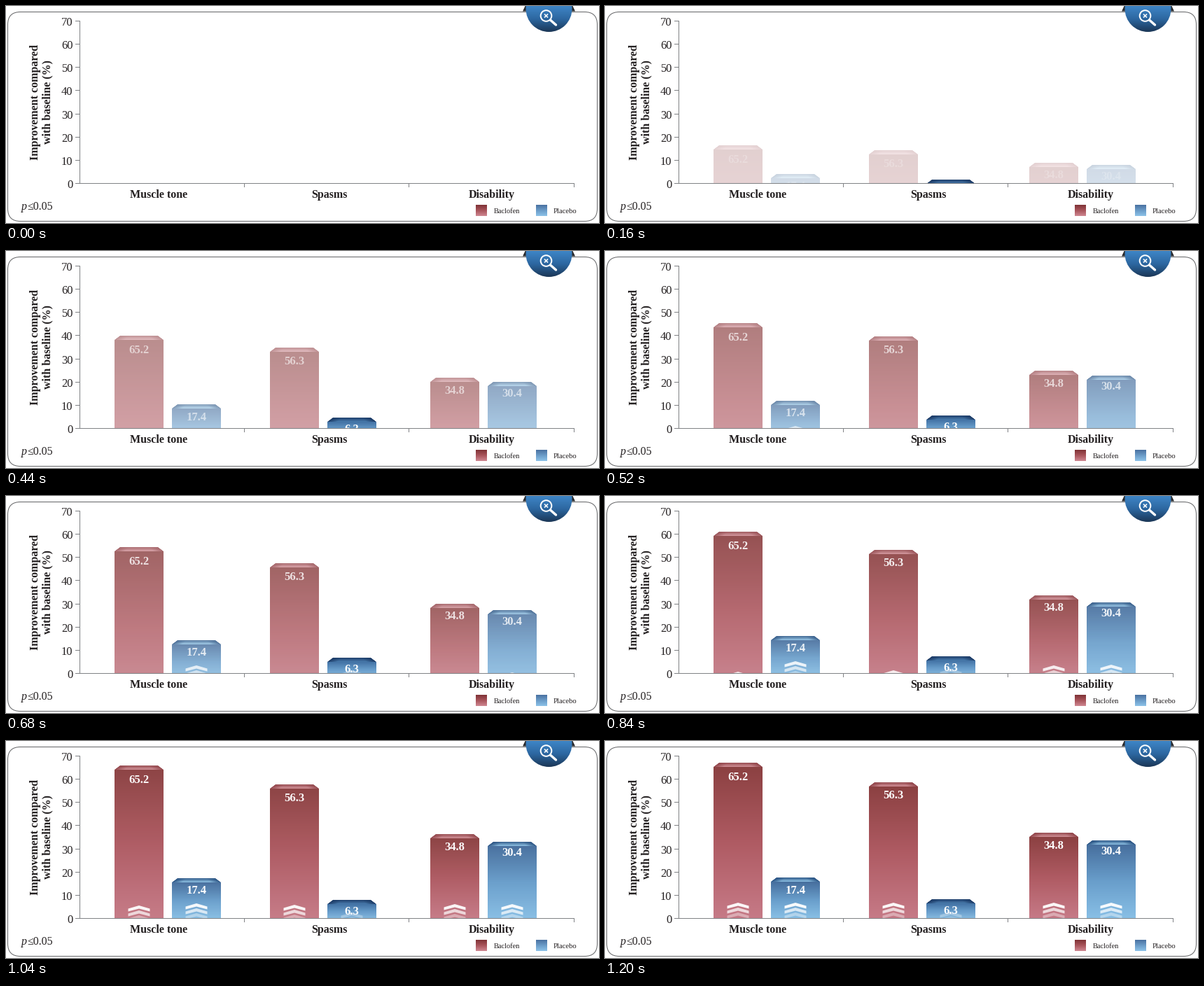
A matplotlib script for the animation above (8 s loop, 847 by 310 pixels).

```python
import numpy as np
import matplotlib.pyplot as plt
from matplotlib.animation import FuncAnimation
from matplotlib.colors import to_rgb
from matplotlib.patches import Circle, FancyBboxPatch, Polygon, Rectangle
from matplotlib.transforms import Affine2D

W, H, DPI = 847, 310, 100
STEP, LOOP, RISE = 40, 8000, 1200  # ms
BASE = 253
SUNK = 2  # extra depth below the baseline at the start
BAR_W, LID_H, LID_INSET = 70, 6, 8
PT = 72 / DPI
INK, AXIS = "#231f20", "#808285"

RED = dict(front=["#8c4142", "#af5b63", "#c67a87"], edge="#94484d", mid="#cc8a91")
BLUE = dict(front=["#476f9e", "#699ecb", "#88bfe5"], edge="#2a5484", mid="#86b9dd")
NAVY = dict(front=["#4474a6", "#669bc9", "#84b8de"], edge="#1d3c68", mid="#4577a8")

# left edge, top of lid, label, label baseline, palette
BARS = [
    (155, 31, "65.2", 55.5, RED),
    (237, 195, "17.4", 217.5, BLUE),
    (377, 59, "56.3", 82.5, RED),
    (459, 226, "6.3", 247, NAVY),
    (606, 131, "34.8", 153.5, RED),
    (688, 142, "30.4", 162.5, BLUE),
]

plt.rcParams["font.family"] = "Liberation Serif"
fig = plt.figure(figsize=(W / DPI, H / DPI), dpi=DPI, facecolor="white")
ax = fig.add_axes([0, 0, 1, 1])
ax.axis("off")


def ramp(colors, n):
    """Vertical colour ramp of n rows."""
    rgb = np.array([to_rgb(c) for c in colors])
    pos = np.linspace(0, 1, n)
    stops = np.linspace(0, 1, len(colors))
    return np.stack([np.interp(pos, stops, rgb[:, k]) for k in range(3)], axis=1)


def gradient(x0, y0, x1, y1, colors, **kw):
    return ax.imshow(ramp(colors, 64)[:, None, :], extent=(x0, x1, y1, y0),
                     aspect="auto", interpolation="bilinear", **kw)


def line(xs, ys, color=AXIS, width=1, cap="butt", **kw):
    ax.plot(xs, ys, color=color, lw=width * PT, snap=False, solid_capstyle=cap, **kw)


def text(x, y, s, px=16, color=INK, **kw):
    kw.setdefault("ha", "center")
    return ax.text(x, y, s, fontsize=px * PT, color=color, va="baseline", **kw)


def bar_image(height, pal):
    """RGBA bar: a bevelled lid over a shaded front."""
    img = np.ones((height, BAR_W, 4))
    img[LID_H:, :, :3] = ramp(pal["front"], height - LID_H)[:, None, :]
    x = np.arange(BAR_W) + 0.5
    side = np.minimum(x, BAR_W - x)
    edge, mid = np.array(to_rgb(pal["edge"])), np.array(to_rgb(pal["mid"]))
    for r in range(LID_H):
        inset = LID_INSET * (1 - (r + 0.5) / LID_H)
        glow = np.clip((side - inset) / 14, 0, 1) * (0.15 + 0.85 * r / (LID_H - 1))
        img[r, :, :3] = edge + (mid - edge) * glow[:, None]
        img[r, :, 3] = np.clip(side - inset + 0.5, 0, 1)
    return img


def chevron(cx, tip):
    return Polygon([(cx - 15.5, tip + 4.5), (cx, tip), (cx + 15.5, tip + 4.5),
                    (cx + 15.5, tip + 8.5), (cx, tip + 4.5), (cx - 15.5, tip + 8.5)],
                   fc="white", ec="none")


class Bar:
    def __init__(self, x, top, label, label_y, pal):
        height = BASE - top
        self.travel = height + SUNK
        self.fades = pal is not NAVY
        self.shift = Affine2D()
        cx = x + BAR_W / 2
        img = ax.imshow(bar_image(height, pal), aspect="auto",
                        extent=(x, x + BAR_W, BASE, top))
        self.parts = [(img, 1)]
        marks = [(231, 0.95), (238, 0.72), (245, 0.38)] if self.fades else [(244, 0.3), (250, 0.15)]
        for tip, alpha in marks:
            self.parts.append((ax.add_patch(chevron(cx, tip)), alpha))
        num = text(cx, label_y, label, 16.5, "white", weight="bold", clip_on=True)
        self.parts.append((num, 1))
        for part, _ in self.parts:
            part.set_transform(self.shift + ax.transData)
            part.set_clip_path(window)

    def rise(self, e):
        self.shift.clear().translate(0, round(self.travel * (1 - e)))
        for part, alpha in self.parts:
            part.set_alpha(alpha * (e if self.fades else 1))
            part.set_visible(e > 0)


def draw_panel():
    ax.add_patch(FancyBboxPatch((2.5, 8.5), 842, 299, fc="none", ec="#636466", lw=PT,
                                boxstyle="round,pad=0,rounding_size=18", snap=False))


def draw_badge():
    ax.add_patch(Polygon([(742, -1), (738, 7.5), (813, 7.5), (809, -1)],
                         fc="#2b2b2d", ec="none", zorder=3))
    disc = Circle((775.5, 4), 33, fc="none", ec="none")
    ax.add_patch(disc)
    gradient(742, 0, 809, 38, ["#3e85c6", "#2c669f", "#1a3453"], zorder=4).set_clip_path(disc)
    ax.add_patch(Circle((771.5, 14), 7.8, fc="none", ec="white", lw=2 * PT, zorder=5))
    for s in (1, -1):
        line([769, 774], [14 - 2.5 * s, 14 + 2.5 * s], "white", 1.6, zorder=5)
    line([777.5, 785.5], [20, 27], "white", 3.4, "round", zorder=5)


def draw_axes():
    line([105.5, 105.5], [21, 254])
    line([105, 812], [253.5, 253.5])
    for k in range(8):
        y = round(BASE - k * 232 / 7) + 0.5
        line([99, 105], [y, y])
        text(95.5, y + 6.5, str(10 * k), 16.5, ha="right")
    for x in (340.5, 575.5, 811.5):
        line([x, x], [253, 259])
    for x, name in ((218, "Muscle tone"), (462, "Spasms"), (693.5, "Disability")):
        text(x, 274, name, weight="bold")
    for x, s in ((46, "Improvement compared"), (63, "with baseline (%)")):
        text(x, 137, s, weight="bold", rotation=90, rotation_mode="anchor")
    text(22, 291, "p", style="italic", ha="left")
    text(30, 291, "≤0.05", ha="left")


def draw_legend():
    gradient(671, 284, 687, 300, ["#7f3336", "#a9555c", "#cf8791"])
    gradient(757, 284, 773, 300, ["#4a71a0", "#6b9cc8", "#8cc2e8"])
    text(697, 296, "Baclofen", 10.4, ha="left")
    text(782, 296, "Placebo", 10.6, ha="left")


window = Rectangle((0, 0), W, BASE, transform=ax.transData)
draw_panel()
draw_axes()
draw_legend()
draw_badge()
bars = [Bar(*spec) for spec in BARS]
ax.set_xlim(0, W)
ax.set_ylim(H, 0)


def update(i):
    t = min(i * STEP / RISE, 1)
    for bar in bars:
        bar.rise(1 - (1 - t) ** 2)
    return []


anim = FuncAnimation(fig, update, frames=LOOP // STEP, interval=STEP,
                     repeat=True, cache_frame_data=False)
plt.show()
```
